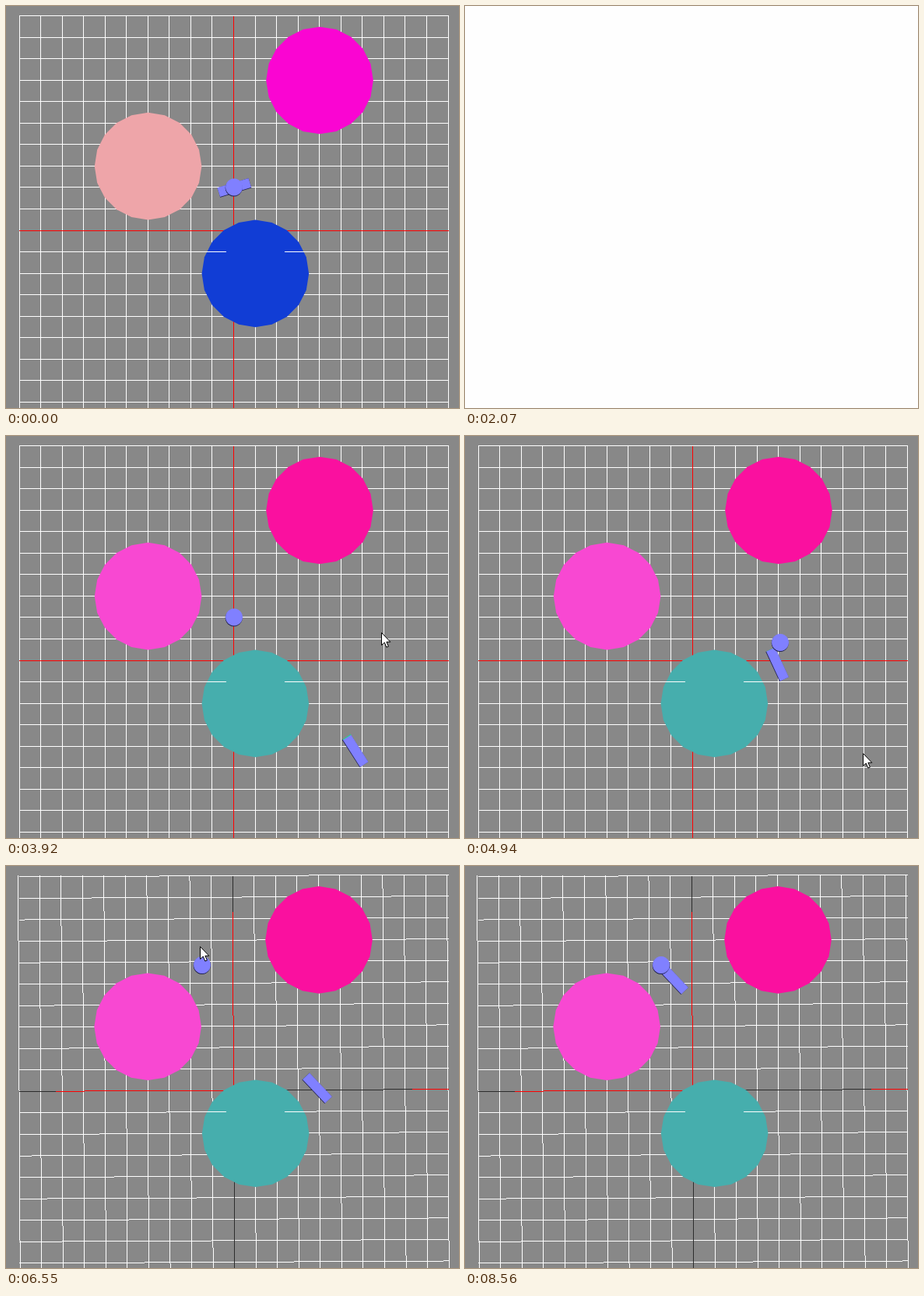
These frames come from a looping animation (582 px wide and 516 px high, 8.64 s). An HTML page with a canvas:

```html
<!DOCTYPE html>
<html lang="en">
<head>
<meta charset="utf-8">
<title>Seeking rod</title>
<style>
  html, body { margin: 0; width: 100%; height: 100%; overflow: hidden; background: #888; }
  canvas { display: block; }
</style>
</head>
<body>
<canvas id="stage" width="582" height="516"></canvas>
<script>
const W = 582, H = 516, LOOP = 8640;
const CX = 292.5, CY = 288, CELL = 27.55;
const RESTART = 2300, STEP = 77.2;
const FIRST_CLICK = 4050, SECOND_CLICK = 6440;
const LILAC = '#8080ff', DARK = '#20204a';
const ctx = document.getElementById('stage').getContext('2d');

function polygon(g, points, color) {
  g.beginPath();
  points.forEach(([x, y]) => g.lineTo(x, y));
  g.closePath();
  g.fillStyle = color;
  g.fill();
}

function disc(g, x, y, r, sides, color) {
  const points = Array.from({ length: sides }, (_, i) => {
    const a = i * 2 * Math.PI / sides;
    return [x + r * Math.cos(a), y + r * Math.sin(a)];
  });
  polygon(g, points, color);
}

// Board with hard-edged lines; tilt is a small view rotation in radians.
function makeBoard(colors, tilt) {
  const board = document.createElement('canvas');
  board.width = W;
  board.height = H;
  const g = board.getContext('2d');
  g.fillStyle = '#888';
  g.fillRect(0, 0, W, H);

  function row(y, from, to, color) {
    g.fillStyle = color;
    for (let x = from; x < to; x++) g.fillRect(x, Math.floor(y - tilt * (x - CX)), 1, 1);
  }
  function column(x, from, to, color) {
    g.fillStyle = color;
    for (let y = from; y < to; y++) g.fillRect(Math.floor(x + tilt * (y - CY)), y, 1, 1);
  }

  for (let i = -10; i <= 10; i++) {
    row(CY + i * CELL, 17, 569, '#fff');
    column(CX + i * CELL, 12, H, '#fff');
  }
  const axis = tilt ? '#2c2c2c' : '#f00';
  row(CY, 17, 569, axis);
  column(CX, 13, H, axis);
  if (tilt) {
    row(CY, 64, 300, '#f00');
    row(CY, 522, 569, '#f00');
    column(CX, 59, 300, '#f00');
  }

  [[4, -7], [-4, -3], [1, 2]].forEach(([u, v], i) => {
    const x = u * CELL, y = v * CELL;
    disc(g, CX + x + tilt * y + 0.3, CY + y - tilt * x + 0.3, 68.8, 20, colors[i]);
  });
  g.fillStyle = '#fff';
  g.fillRect(257, 315, 26, 1);
  g.fillRect(358, 315, 26, 1);
  return board;
}

const laterColors = ['#fa109f', '#f848d2', '#46aead'];
const boards = {
  first: makeBoard(['#fa05d2', '#eea5a9', '#113dd5'], 0),
  flat: makeBoard(laterColors, 0),
  tilted: makeBoard(laterColors, 0.0052)
};

function sphere(x, y) {
  disc(ctx, x - 0.3, y + 1, 11, 24, DARK);
  disc(ctx, x, y, 11, 24, LILAC);
}

// The rod's front end points to -x in its own frame.
function rod(x, y, degrees) {
  ctx.save();
  ctx.translate(x, y);
  ctx.rotate(degrees * Math.PI / 180);
  ctx.fillStyle = DARK;
  ctx.fillRect(-21, -6, 42, 13);
  ctx.fillStyle = LILAC;
  ctx.fillRect(-21, -6.2, 42, 12.4);
  const edge = Math.max(0, (Math.hypot(x - CX, y - CY) - 100) / 95);
  ctx.fillStyle = '#28dc80';
  ctx.fillRect(-21, -6.2, edge, 12.4);
  ctx.restore();
}

const arrow = [[0, 0], [0, 16], [3.8, 12.6], [6.3, 18.6], [8.9, 17.6], [6.4, 11.8], [11.3, 11.8]];
function pointer(x, y) {
  ctx.save();
  ctx.translate(x + 0.5, y + 0.5);
  polygon(ctx, arrow, '#fff');
  ctx.strokeStyle = '#000';
  ctx.lineWidth = 1;
  ctx.stroke();
  ctx.restore();
}

const clamp = v => Math.min(1, Math.max(0, v));
const mix = (a, b, p) => a.map((v, i) => v + (b[i] - v) * p);

// Constant acceleration up to full speed, then steady.
function speedUp(t, start, end) {
  const ramp = 650;
  const path = s => s < ramp ? s * s / (2 * ramp) : s - ramp / 2;
  return path(clamp((t - start) / (end - start)) * (end - start)) / path(end - start);
}

function rodPose(t) {
  const start = [513, 508, 52], bend = [449, 404, 57.4];
  const near = [401.5, 293, 65], rest = [400, 285, 68];
  if (t < 3920) return mix(start, bend, speedUp(t, 2500, 3920));
  if (t < 4925) return mix(bend, near, (t - 3920) / 1005);
  if (t < SECOND_CLICK) return mix(near, rest, clamp((t - 4925) / 75));
  return mix([400, 285, 46.5], [268, 145, 46.5], speedUp(t, 6520, 8553));
}

// time, x, y of the pointer tip
const pointerPath = [
  [2300, 296, 418], [2530, 302, 437], [2900, 350, 520], [3230, 400, 510],
  [3560, 450, 380], [3920, 482, 252], [4076, 402, 241], [4240, 408, 250],
  [4600, 470, 340], [4925, 511, 407], [5350, 546, 505], [5600, 490, 430],
  [5930, 327, 260], [6390, 249, 103], [6560, 249, 103], [6900, 400, 300],
  [7200, 537, 480], [7350, 537, 530]
];

function pointerAt(t) {
  const i = pointerPath.findIndex(key => key[0] > t);
  if (i < 1) return null;
  const a = pointerPath[i - 1], b = pointerPath[i];
  const p = (t - a[0]) / (b[0] - a[0]);
  return mix(a, b, p * p * (3 - 2 * p)).slice(1).map(Math.round);
}

function drawFirst(t) {
  ctx.drawImage(boards.first, 0, 0);
  rod(293.3, 233, -17);
  sphere(293, 232.5);
  if (t >= 260 && t < 420) pointer(392, 453);
}

function drawChase(t) {
  const moved = t >= SECOND_CLICK;
  ctx.drawImage(moved ? boards.tilted : boards.flat, 0, 0);
  rod(...rodPose(t));
  if (moved) sphere(252, 127);
  else if (t >= FIRST_CLICK) sphere(405, 265);
  else sphere(293, 232.5);
  const tip = pointerAt(t);
  if (tip) pointer(...tip);
}

function draw(t) {
  if (t < 2070) {
    drawFirst(t);
  } else if (t < RESTART) {
    ctx.fillStyle = '#fefefe';
    ctx.fillRect(0, 0, W, H);
  } else {
    drawChase(RESTART + Math.floor((t - RESTART + 12) / STEP) * STEP);
  }
}

const began = performance.now();
function tick() {
  draw((performance.now() - began) % LOOP);
  requestAnimationFrame(tick);
}
tick();
</script>
</body>
</html>
```
